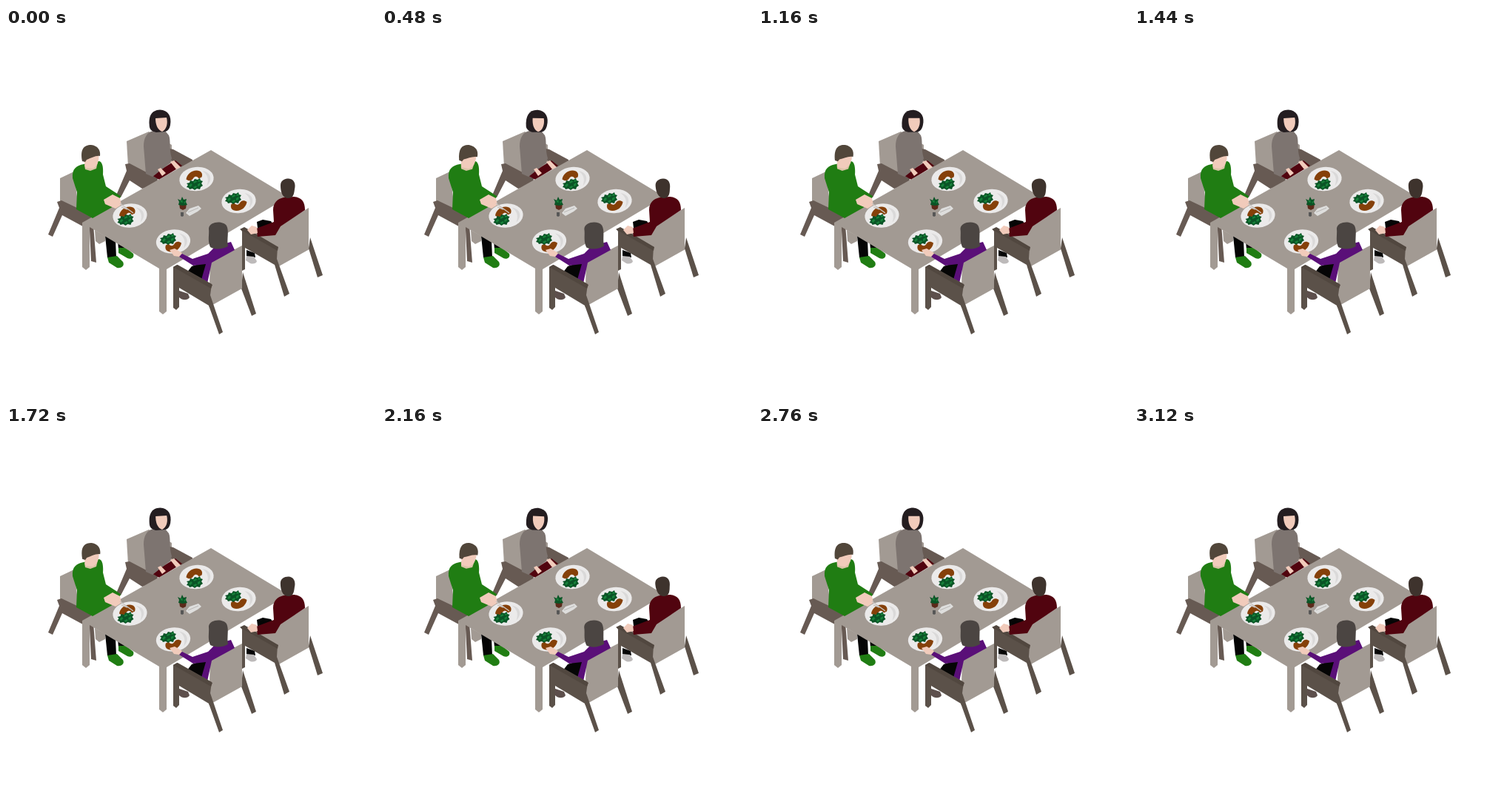
An HTML page for the animation above (3.16 s loop, 500x500 px).

```html
<!DOCTYPE html>
<html lang="en">
<head>
<meta charset="utf-8">
<title>Dinner for four</title>
<style>
  html, body { margin: 0; width: 100%; height: 100%; overflow: hidden; background: #fff; }
  svg { display: block; width: 100vw; height: 100vh; }
  .light { fill: #a29a93; }
  .wood { fill: #5b5149; }
  .wood.far { fill: #675a53; }
  .rim { fill: #51473f; }
  .skin { fill: #f1cbbb; }
  .green { fill: #207d13; }
  .maroon { fill: #51040f; }
  .purple { fill: #5a0f78; }
  .grey { fill: #7d7470; }
  .black { fill: #050505; }
  .leaf { fill: #0a5426; }
  .leaf2 { fill: #17823a; }
  .meat { fill: #854009; }
</style>
</head>
<body>
<svg viewBox="0 0 500 500">
  <defs>
    <ellipse id="plate" rx="23.2" ry="16.200" fill="#ebeaea" transform="rotate(-6)"/>
    <path id="shine" d="M8-11C20-9 22 2 14 9C17 0 15-6 8-11Z" fill="#dad9d9"/>
    <path id="meat" class="meat" d="M-11 4C-10-3-4-8 3-8C9-8 12-4 10 1L6 3C5 0 1-1-1 2C-3 6-7 7-11 4Z"/>
    <g id="salad">
      <path class="leaf" d="M-11 4L-9 1L-11-1L-7-2L-6-5L-2-4L0-7L4-6L7-8L8-5L11-4L9-1L11 2L8 4L7 7L3 6L0 8L-3 6L-7 7L-8 5Z"/>
      <path class="leaf2" d="M-8 2l3-3 2 2-3 3ZM-2-3l4-2 1 2-4 2ZM4 0l4-2-1 4-3 1ZM-2 4l4-2 1 2-3 2ZM4-5l3-1 1 2-3 1Z"/>
    </g>
  </defs>

  <!-- back chair and guest -->
  <path class="light" d="M163 153L193 140L224 158V182L190 205L165 187Z"/>
  <path class="wood far" d="M221 163L226 164L252 178V182L238 190L222 178Z"/>
  <path class="wood far" d="M161 184L167 183L205 203L204 213L184 217L167 206L155 229L149 226L163 193Z"/>
  <path class="maroon" d="M197 199L229 179L238 186L207 205Z"/>
  <path class="grey" d="M199 139C190 141 186 149 186 160L189 197L198 201L222 182L224 176C220 163 223 152 220 145L215 139Z"/>
  <path class="skin" d="M205 191L209 189L216 196L211 200ZM222 181L227 179L236 188L230 191Z"/>
  <g id="backHead">
    <path fill="#241d20" d="M194 134C192 120 196 111 208 110.500C219 111 224 119 222 131C221 136 219 139 215 140L203 141C198 140 195 138 194 134Z"/>
    <path class="skin" d="M202 122L217 121C219 129 217 137 211 140C205 138 202 131 202 122Z"/>
  </g>

  <!-- left chair and guest -->
  <path class="light" d="M73 203L92 194L98 245L73 236Z"/>
  <path class="wood far" d="M69 235L75 233L117 253L122 317L115 315L113 273L76 253L63 282L57 279L72 243Z"/>
  <path class="light" d="M120 273L134 281V288L126 292L121 288Z"/>
  <path class="black" d="M134 281L148 287L149 310H137ZM151 288L165 296L163 300L152 299Z"/>
  <path class="green" d="M137 310L150 308L158 316C161 322 155 325 150 324L139 317ZM152 297L162 297L172 305C174 311 168 313 164 311L152 304Z"/>

  <!-- table -->
  <path class="light" d="M277 165L380 227V229L217 326V383L212 387L207 383V325L113 269V323L108 327L103 323V263Z"/>
  <path class="green" d="M105 184C95 186 89 190 90 203L96 222L95 245L117 257L142 243L152 236L155 227L135 214L131 198C132 185 129 177 122 181Z"/>
  <g id="leftHead">
    <path fill="#d9c3a6" d="M106 185L124 181L122 190L114 193L107 191Z"/>
    <path class="skin" d="M105 174L125 168C127 181 122 188 117 190L107 189Z"/>
    <path fill="#51463a" d="M103 180C100 164 105 158 115 158C124 159 128 165 127 173C121 172 115 176 109 178L107 181Z"/>
  </g>
  <g id="plates"></g>
  <path class="skin" d="M132 232L144 225L154 230L156 239L148 244L134 238Z"/>
  <path d="M154 237L172 250M156 242L164 245" stroke="#c9c5c2" stroke-width="1.500"/>
  <path fill="#5b2a1a" d="M234 237H244L243 244L239 246L235 244Z"/>
  <path class="leaf" d="M232 231L236 233L238 228L240 232L244 231L243 235L245 239L239 240L233 239L234 235Z"/>
  <path class="leaf2" d="M235 235l3-3 1 4ZM240 236l3-3-1 4Z"/>
  <path fill="#575757" d="M236 249L240 249V254L238 255L236 254Z"/>
  <path fill="#dededd" d="M243 250L248 244L260 240L264 244L259 248L248 254Z"/>
  <path d="M246 249L260 243" stroke="#b9b7b5"/>

  <!-- right guest and chair -->
  <path class="black" d="M339 262L347 259L358 261L364 270L340 270ZM325 300L336 304L337 310L325 309Z"/>
  <path fill="#bdbaba" d="M325 308L335 309L339 315C338 319 333 319 330 318L324 314Z"/>
  <path class="wood" d="M409 298L411 283L428 334L421 337Z"/>
  <path class="light" d="M335 278L366 270L409 243V299.500L367 323Z"/>
  <path class="wood" d="M317 272L323 270L367 296L366 312L383 359L376 363L363 320L323 297V326L319 328V275Z"/>
  <path class="rim" d="M316 272L322 269L368 296L367 301Z"/>
  <path class="maroon" d="M375 229C367 231 361 236 361 246L362 262L338 271L340 282L364 280L371 268L404 246C404 235 400 229 389 228Z"/>
  <path class="skin" d="M326 273L332 267L339 269L340 277L331 279Z"/>
  <g id="rightHead">
    <path fill="#3e332d" d="M371 213C371 206 376 203.500 382 203.500C389 204 392 210 390 218C389 227 387 230 381 230C374 230 371 222 371 213Z"/>
  </g>

  <!-- front guest and chair -->
  <path fill="#5d4f4c" d="M234 355L246 359L248 364C245 369 237 368 233 363Z"/>
  <path class="wood" d="M318 352L320 330L338 386L332 389Z"/>
  <path class="light" d="M276 316L319 294V352L274 377Z"/>
  <path class="black" d="M244 331L251 322L269 316L273 324L268 343Z"/>
  <path class="purple" d="M234 309L238 305L252 312L273 305L283 295L304 289L309 300L278 317L272 345L264 340L270 319L253 321Z"/>
  <path class="skin" d="M221 300L228 298L238 304L234 309L227 308Z"/>
  <path class="wood" d="M226 323L232 320L278 346L276 361L293 411L288 414L274 375L234 351V377L230 381L226 378Z"/>
  <path class="rim" d="M226 323L231 320L279 347L277 352Z"/>
  <g id="frontHead">
    <path fill="#4b4542" d="M274 271C275 261 293 260 298 267C302 275 298 285 300 295C293 299 283 300 276 296C272 286 275 280 274 271Z"/>
  </g>
</svg>
<script>
  const LOOP = 3160, STEP = 40, SWINGS = 2;

  // plate x, y, offsets of the meat and the salad, turn of the meat
  const plates = [
    [257.5, 204, -3, -3.5, -2.5, 7, 0],
    [314.5, 234, 0, 5, -7.5, -4, 180],
    [167.5, 253.5, -3.5, -4, -6, 5.5, 0],
    [226, 288.5, 0, 6, -7, -3.5, 180]
  ];
  const use = (id, x, y, turn = 0) =>
    `<use href="#${id}" transform="translate(${x} ${y}) rotate(${turn})"/>`;
  document.getElementById('plates').innerHTML = plates.map(([x, y, mx, my, sx, sy, turn]) =>
    use('plate', x, y) + use('shine', x, y) +
    use('meat', x + mx, y + my, turn) + use('salad', x + sx, y + sy)).join('');

  // head, full tilt in degrees, pivot
  const heads = [
    ['backHead', 7, 207, 142],
    ['leftHead', 9, 115, 191],
    ['rightHead', -7, 381, 230],
    ['frontHead', -3, 288, 290]
  ].map(([id, tilt, x, y]) => ({ el: document.getElementById(id), tilt, x, y }));

  const start = performance.now();
  function draw(now) {
    const t = Math.floor(Math.max(0, now - start) % LOOP / STEP) * STEP;
    const swing = (1 - Math.cos(2 * Math.PI * SWINGS * t / LOOP)) / 2;
    for (const { el, tilt, x, y } of heads)
      el.setAttribute('transform', `rotate(${(tilt * swing).toFixed(3)} ${x} ${y})`);
    requestAnimationFrame(draw);
  }
  draw(start);
</script>
</body>
</html>
```
